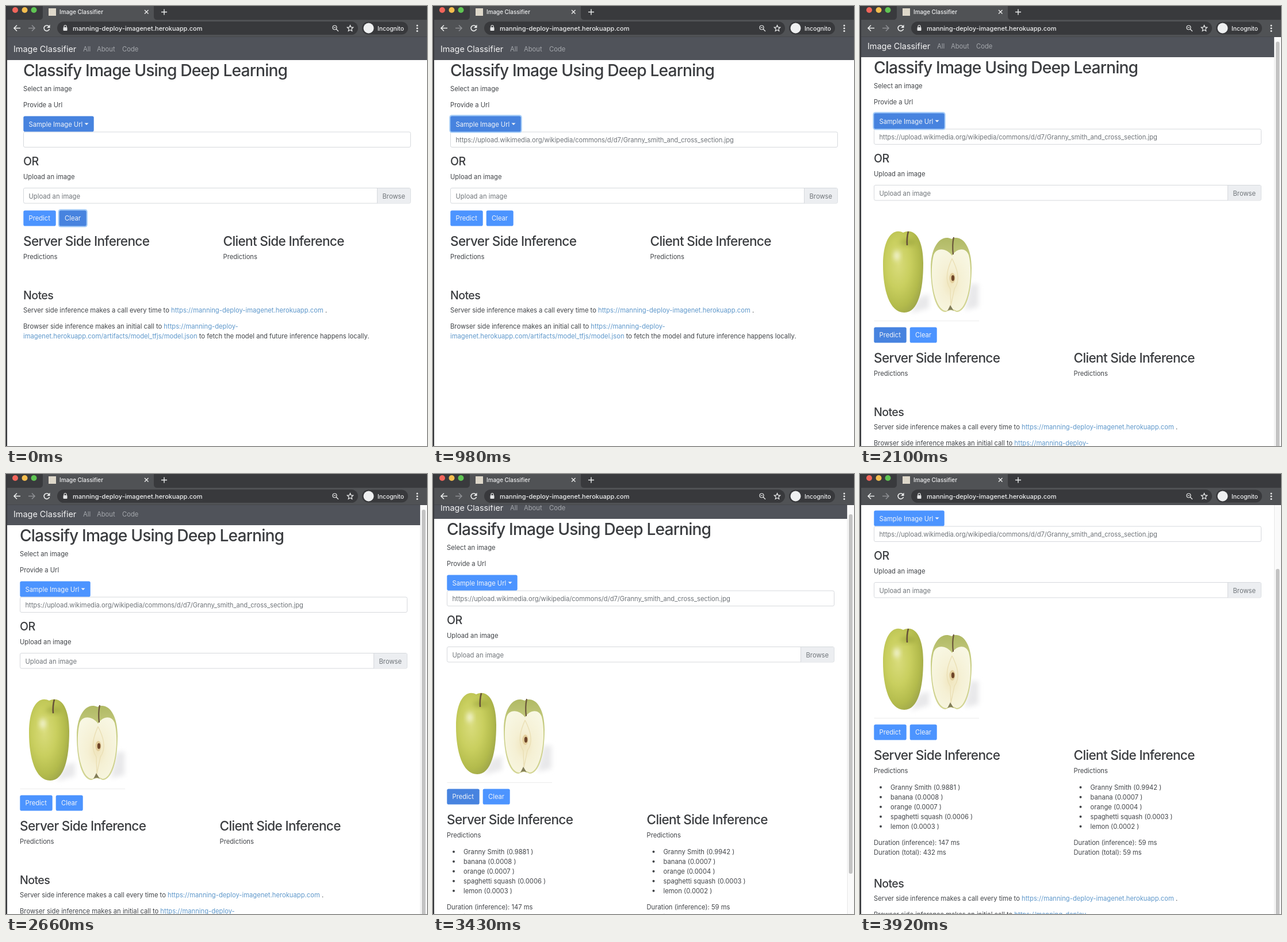
An HTML page that plays this animation: 732 px wide and 765 px high, repeating every 3990 ms.

```html
<!DOCTYPE html>
<html lang="en">
<head>
<meta charset="utf-8">
<title>Image Classifier</title>
<style>
html, body { margin: 0; width: 100%; height: 100%; overflow: hidden; background: #fff; }
svg { display: block; width: 732px; height: 765px; --base: #4c94ff; --hover: #4783df; --active: #3f7cd7; }
text { font: 11.22px Inter, "Open Sans", sans-serif; fill: #424549; white-space: pre; }
.h1, .h2, .h3 { font-weight: 500; letter-spacing: -.03em; fill: #3b3d40; }
.h1 { font-size: 28.2px; }
.h2 { font-size: 22.6px; }
.h3 { font-size: 19.6px; }
.muted { fill: #70757a; }
.link { fill: #5f98cb; }
.white { fill: #f3f5f8; }
.brand { font-size: 14.4px; fill: #f4f4f5; }
.nav { fill: #a4a7ac; }
.bar { font-size: 11px; font-weight: 500; fill: #eff0f1; }
.field { fill: #fff; stroke: #d6d9dd; }
.ring { fill: #a6cdf8; }
.btn { fill: var(--base); }
.ico { fill: none; stroke: #eceded; stroke-width: 1.6; }

.anim, .anim * { animation: 3990ms step-end infinite; }
#page { animation-name: shift; }
#scroll { animation-name: scroll; }
#lower { animation-name: lower; }
#notes { animation-name: notes; }
#thumb { animation-name: thumb; }
#menu { animation-name: menu; }
#url { animation-name: url; letter-spacing: -.0045em; }
#photo, #track { animation-name: photo; }
#results { animation-name: results; }
#sample { animation-name: sample; }
#sampleRing { animation-name: sampleRing; }
#clear { animation-name: clear; }
#clearRing { animation-name: clearRing; }
#predict { animation-name: predict; }

@keyframes shift { 0% { transform: none } 28%, 100% { transform: translateX(-6px) } }
@keyframes lower { 0% { transform: none } 28%, 100% { transform: translateY(208px) } }
@keyframes notes { 0% { transform: none } 68.4%, 100% { transform: translateY(129px) } }
@keyframes scroll {
  0% { transform: none }
  42% { transform: translateY(-5px) }
  84.1% { transform: translateY(-8px) }
  85.9% { transform: translateY(-16px) }
  87.6% { transform: translateY(-33px) }
  89.4%, 100% { transform: translateY(-128px) }
}
@keyframes thumb {
  0% { transform: none; height: 730px }
  42% { transform: translateY(5px); height: 730px }
  68.4% { transform: translateY(4px); height: 625px }
  84.1% { transform: translateY(7px); height: 625px }
  85.9% { transform: translateY(13px); height: 625px }
  87.6% { transform: translateY(27px); height: 625px }
  89.4%, 100% { transform: translateY(108px); height: 625px }
}
@keyframes menu { 0% { opacity: 0 } 7% { opacity: 1 } 24.5%, 100% { opacity: 0 } }
@keyframes url { 0% { opacity: 0 } 24.5%, 100% { opacity: 1 } }
@keyframes photo { 0% { opacity: 0 } 28%, 100% { opacity: 1 } }
@keyframes results { 0% { opacity: 0 } 68.4%, 100% { opacity: 1 } }
@keyframes sample { 0% { fill: var(--hover) } 7% { fill: var(--active) } 24.5% { fill: var(--hover) } 56%, 100% { fill: var(--base) } }
@keyframes sampleRing { 0% { opacity: 0 } 7% { opacity: 1 } 56%, 100% { opacity: 0 } }
@keyframes clear { 0% { fill: var(--hover) } 7%, 100% { fill: var(--base) } }
@keyframes clearRing { 0% { opacity: 1 } 7%, 100% { opacity: 0 } }
@keyframes predict { 0% { fill: var(--base) } 45.6% { fill: var(--hover) } 56% { fill: var(--base) } 85.9% { fill: var(--hover) } 89.4%, 100% { fill: var(--base) } }
</style>
</head>
<body>
<svg viewBox="0 0 732 765">
  <defs>
    <radialGradient id="skin" cx=".38" cy=".4" r=".66">
      <stop offset="0" stop-color="#d9dc7c"/><stop offset=".45" stop-color="#c9cf5f"/>
      <stop offset=".8" stop-color="#b3bb4c"/><stop offset="1" stop-color="#a0a84a"/>
    </radialGradient>
    <radialGradient id="flesh" cx=".5" cy=".55" r=".6">
      <stop offset="0" stop-color="#f0e5bd"/><stop offset=".4" stop-color="#f5f0d4"/><stop offset="1" stop-color="#f8f7e3"/>
    </radialGradient>
    <linearGradient id="rind" x2="0" y2="1">
      <stop offset="0" stop-color="#b0b964"/><stop offset=".3" stop-color="#c5cb80"/><stop offset="1" stop-color="#d3d594"/>
    </linearGradient>
    <filter id="soft" x="-60%" y="-60%" width="220%" height="220%"><feGaussianBlur stdDeviation="4"/></filter>
    <filter id="edge"><feGaussianBlur stdDeviation=".7"/></filter>
  </defs>
  <rect width="732" height="765" fill="#fff"/>

  <g class="anim">
    <g id="scroll">
      <rect y="50" width="732" height="44" fill="#50535a"/>
      <text class="brand" x="13" y="79.5">Image Classifier</text>
      <text class="nav" x="134" y="79">All</text>
      <text class="nav" x="158" y="79">About</text>
      <text class="nav" x="202" y="79">Code</text>

      <g id="page">
        <text class="h1" x="30" y="122">Classify Image Using Deep Learning</text>
        <text x="30" y="148">Select an image</text>
        <text x="30" y="176">Provide a Url</text>
        <rect class="field" x="30.5" y="219" width="673" height="26.5" rx="2.5"/>
        <text id="url" class="muted" x="39.5" y="237">https://upload.wikimedia.org/wikipedia/commons/d/d7/Granny_smith_and_cross_section.jpg</text>
        <rect id="sampleRing" class="ring" x="28.3" y="189.3" width="126.4" height="31.2" rx="4.5"/>
        <rect id="sample" class="btn" x="30.3" y="191.4" width="122.4" height="27.1" rx="2.8"/>
        <text class="white" x="39.5" y="209.5">Sample Image Url</text>
        <path class="white" d="M136.5 203.5h7l-3.5 3.5z" fill="#f3f5f8"/>
        <text class="h3" x="30" y="277">OR</text>
        <text x="30" y="300.5">Upload an image</text>
        <rect class="field" x="30.5" y="316.5" width="673" height="26.5" rx="2.5"/>
        <path d="M645.5 317H701q2.3 0 2.3 2.3V340q0 2.5-2.3 2.5H645.5z" fill="#eceef1"/>
        <path d="M645.5 317V343" stroke="#d6d9dd"/>
        <text class="muted" x="39.5" y="334.5">Upload an image</text>
        <text class="muted" x="654.5" y="334.5">Browse</text>

        <g id="photo">
          <path d="M30.5 552.5H213" stroke="#ececec"/>
          <g transform="translate(6)" filter="url(#edge)">
            <path d="M192 488H206V528L182 534ZM102 512L120 506V530L88 539Z" fill="#e8e8ea" filter="url(#soft)"/>
            <path d="M75 399C96 389 110 412 110 452C110 500 101 538 77 538C51 538 40 498 40 455C40 409 57 390 75 399Z" fill="url(#skin)"/>
            <ellipse cx="83" cy="416" rx="14" ry="5" fill="#87922f" opacity=".5" filter="url(#soft)"/>
            <ellipse cx="64" cy="439" rx="5" ry="9" fill="#fafae6" opacity=".9" filter="url(#soft)"/>
            <path d="M82 421Q81 408 84 397" fill="none" stroke="#665139" stroke-width="2.6"/>
            <path d="M159 410C178 401 194 424 194 460C194 505 184 537 168 537Q158 531 149 537C133 537 123 505 123 460C123 424 140 401 159 410Z" fill="url(#rind)"/>
            <path d="M160 439C166 428 183 422 189 438C198 474 187 535 168 535Q158 529 150 535C130 535 119 474 128 438C134 422 153 428 160 439Z" fill="url(#flesh)"/>
            <path d="M160 444C153 460 146 480 157 497L158 526M160 444C168 460 176 480 164 497L158 526" fill="none" stroke="#ebe0b6" stroke-width="1.5"/>
            <ellipse cx="160.5" cy="478" rx="5" ry="9" fill="#e2cd9b"/>
            <ellipse cx="161.5" cy="478" rx="2.7" ry="5" fill="#6f4629"/>
            <path d="M152 535L157 525L163 535Q158 531 152 535" fill="#827d58"/>
            <path d="M162 437Q160 420 163 407" fill="none" stroke="#6a553b" stroke-width="2.2"/>
          </g>
        </g>

        <g id="lower">
          <rect id="predict" class="btn" x="30.3" y="355.4" width="56.4" height="27.1" rx="2.8"/>
          <text class="white" x="39.5" y="373">Predict</text>
          <rect id="clearRing" class="ring" x="90.6" y="353.3" width="51.2" height="31.2" rx="4.5"/>
          <rect id="clear" class="btn" x="92.7" y="355.4" width="47" height="27.1" rx="2.8"/>
          <text class="white" x="102" y="373">Clear</text>
          <text class="h2" x="30" y="416.5">Server Side Inference</text>
          <text class="h2" x="377.5" y="416.5">Client Side Inference</text>
          <text x="30" y="440">Predictions</text>
          <text x="377.5" y="440">Predictions</text>
          <g id="results"></g>
          <g id="notes">
            <text class="h3" x="30" y="509.5">Notes</text>
            <text x="30" y="533">Server side inference makes a call every time to <tspan class="link">https://manning-deploy-imagenet.herokuapp.com</tspan> .</text>
            <text x="30" y="561">Browser side inference makes an initial call to <tspan class="link">https://manning-deploy-</tspan></text>
            <text x="30" y="578"><tspan class="link">imagenet.herokuapp.com/artifacts/model_tfjs/model.json</tspan> to fetch the model and future inference happens locally.</text>
          </g>
        </g>

        <g id="menu">
          <rect x="30.5" y="220.5" width="183" height="171" rx="3" fill="#fff" stroke="#dcdcdd"/>
        </g>
      </g>
    </g>
    <g id="track">
      <rect x="720" y="54" width="12" height="711" fill="#fafafa"/>
      <path d="M720.5 54V765" stroke="#e8e8e8"/>
      <rect id="thumb" x="723" y="57" width="6.5" height="730" rx="3.2" fill="#c3c3c3"/>
    </g>
  </g>

  <rect width="732" height="54" fill="#505255"/>
  <path d="M0 0H64V18Q64 24 58 24H0ZM257 0H732V24H263Q257 24 257 18Z" fill="#393a3d"/>
  <path d="M0 53.5H732" stroke="#46484c"/>
  <circle cx="16" cy="7" r="5" fill="#f2655b"/>
  <circle cx="32.5" cy="7" r="5" fill="#f5be4f"/>
  <circle cx="48.5" cy="7" r="5" fill="#5fc553"/>
  <rect x="74" y="4" width="13" height="13" fill="#ded8ca"/>
  <text class="bar" x="93" y="14" style="font-size:9.9px">Image Classifier</text>
  <path class="ico" d="M241 7l6.5 6.5M247.5 7l-6.5 6.5M270 10.5h10M275 5.5v10" style="stroke-width:1.4"/>
  <path class="ico" d="M25 38.5H14M19 33.5l-5 5 5 5"/>
  <path class="ico" d="M39 38.5H50M45 33.5l5 5-5 5" style="stroke:#8e9094"/>
  <path class="ico" d="M75 36A4.8 4.8 0 1 0 75.5 40"/>
  <path d="M76.5 32.5V38H71Z" fill="#eceded"/>
  <rect x="89" y="27" width="523" height="23" rx="11.5" fill="#38393c"/>
  <rect x="99.5" y="37" width="7" height="6" rx="1" fill="#e4e5e6"/>
  <path class="ico" d="M101 37.5V35.5a2 2 0 0 1 4 0V37.5" style="stroke-width:1.2"/>
  <text class="bar" x="116" y="42.5">manning-deploy-imagenet.herokuapp.com</text>
  <g class="ico" style="stroke-width:1.2">
    <circle cx="571.5" cy="37.5" r="3.5"/>
    <path d="M574 40l4 4M569.8 37.5h3.4M598.5 33.5l1.5 3.4 3.7.4-2.8 2.5.8 3.7-3.2-1.9-3.2 1.9.8-3.7-2.8-2.5 3.7-.4z"/>
  </g>
  <rect x="619" y="27.5" width="80" height="22" rx="11" fill="#38393c"/>
  <circle cx="630.5" cy="38.5" r="9" fill="#eff0f1"/>
  <text class="bar" x="646" y="42.5" style="font-size:10.3px">Incognito</text>
  <g fill="#eceded"><circle cx="715" cy="34" r="1.5"/><circle cx="715" cy="38.7" r="1.5"/><circle cx="715" cy="43.4" r="1.5"/></g>
  <rect width="2" height="765" fill="#333438"/>
</svg>
<script>
const svg = (parent, tag, attrs, content = '') => {
  const node = document.createElementNS('http://www.w3.org/2000/svg', tag);
  for (const key in attrs) node.setAttribute(key, attrs[key]);
  node.textContent = content;
  parent.append(node);
};

const menu = document.getElementById('menu');
const choices = ['Granny Smith apple', 'keyboard', 'killer whale', 'Labrador retriever',
  'Zelvik (not in training data)', 'sphinx (not in training data)', 'salad (not in training data)'];
choices.forEach((label, i) => svg(menu, 'text', { x: 48.5, y: 243 + 22.6 * i }, label));

const results = document.getElementById('results');
const labels = ['Granny Smith', 'banana', 'orange', 'spaghetti squash', 'lemon'];
const addResults = (x, scores, inference, total) => {
  labels.forEach((label, i) => {
    const y = 468.5 + 17 * i;
    svg(results, 'circle', { cx: x + 12, cy: y - 3.7, r: 2, fill: '#424549' });
    svg(results, 'text', { x: x + 29, y }, `${label} (${scores[i]} )`);
  });
  svg(results, 'text', { x, y: 564.5 }, `Duration (inference): ${inference} ms`);
  svg(results, 'text', { x, y: 581.5 }, `Duration (total): ${total} ms`);
};
addResults(30, ['0.9881', '0.0008', '0.0007', '0.0006', '0.0003'], 147, 432);
addResults(377.5, ['0.9942', '0.0007', '0.0004', '0.0003', '0.0002'], 59, 59);
</script>
</body>
</html>
```
